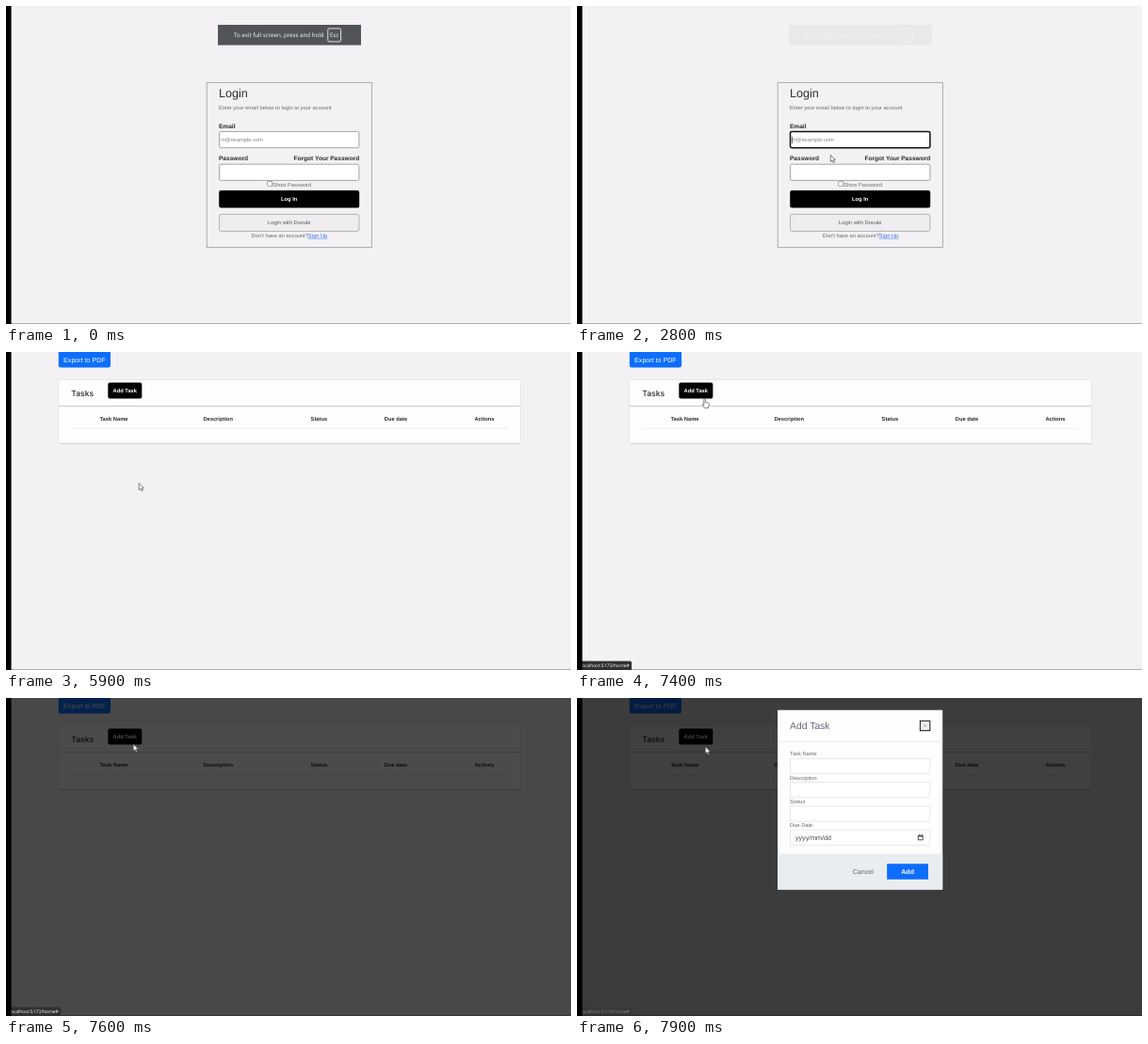
An HTML page that plays this animation: 600x338 px, repeating every 8000 ms.

```html
<!DOCTYPE html>
<html lang="en">
<head>
<meta charset="utf-8">
<title>Login and tasks</title>
<style>
  html, body { margin: 0; width: 100%; height: 100%; overflow: hidden; background: #f3f1f4; }
  svg { display: block; width: 600px; height: 338px; }
  text {
    font: 5.75px "Liberation Sans", Arial, sans-serif;
    fill: #6b6a6d; text-rendering: geometricPrecision; white-space: pre;
  }
  .ui { font-family: "Open Sans", "Noto Sans", sans-serif; fill: #fff; }
  .bold { font-weight: 700; fill: #29282a; }
  .label { font-size: 6.55px; }
  .mid { font-size: 7.1px; }
  .white { fill: #fff; }
  .middle { text-anchor: middle; }
  .field { fill: #fff; stroke: #929194; stroke-width: .8; }
  .field.focus { stroke: #101010; stroke-width: 1.5; }
  .line { fill: #fff; stroke: #dfe2e6; stroke-width: .8; }
  .blue { fill: #0d6efd; }
  .pointer { fill: #fff; stroke: #4c4c4e; stroke-width: .7; stroke-linejoin: round; }
</style>
</head>
<body>
<svg viewBox="0 0 600 338">
  <rect width="600" height="338" fill="#f3f1f4"/>

  <g id="login">
    <rect x="213.2" y="81.4" width="175.2" height="175.2" fill="none" stroke="#a5a4a7" stroke-width=".9"/>
    <text x="226" y="97.3" style="font-size:12.6px;fill:#2e2d2f">Login</text>
    <text x="226" y="110">Enter your email below to login to your account</text>

    <text class="bold label" x="226" y="130">Email</text>
    <rect id="email" class="field" x="226.5" y="133.5" width="148.4" height="17.2" rx="1.6"/>
    <text x="228" y="144.2" style="fill:#858487">m@example.com</text>
    <path id="caret" d="M228.4 138.8V146" stroke="#222" stroke-width=".7"/>

    <text class="bold label" x="226" y="164.3">Password</text>
    <text class="bold label" x="375.2" y="164.3" text-anchor="end">Forgot Your Password</text>
    <rect id="password" class="field" x="226.5" y="168.2" width="148.4" height="17.2" rx="1.6"/>

    <rect x="277.7" y="186.4" width="5" height="5" rx=".8" fill="#fff" stroke="#777" stroke-width=".7"/>
    <text x="283" y="191.6">Show Password</text>

    <rect x="226.2" y="196" width="149" height="18.6" rx="2"/>
    <text class="bold white middle" x="300.7" y="207.2">Log In</text>
    <rect x="226.5" y="221.4" width="148.4" height="18" rx="2" fill="#efedf0" stroke="#a3a2a5" stroke-width=".8"/>
    <text class="middle" x="300.7" y="232.3" style="fill:#58575a">Login with Dovule</text>

    <text x="260.6" y="245.8">Don't have an account?<tspan fill="#3b74ee" text-decoration="underline">Sign Up</tspan></text>
  </g>

  <g id="hint">
    <rect x="225" y="20" width="152" height="21.6" fill="#515459"/>
    <text class="ui" x="242" y="33" style="font-size:6.18px">To exit full screen, press and hold</text>
    <rect x="341.8" y="23.9" width="13.8" height="14" rx="1.4" fill="none" stroke="#f2f2f2" stroke-width=".9"/>
    <text class="ui middle" x="348.7" y="33" style="font-size:6.18px">Esc</text>
  </g>

  <g id="tasks">
    <rect class="blue" x="55.8" y="-3" width="55.2" height="19.6" rx="2.4"/>
    <text class="mid white middle" x="83.4" y="10.6">Export to PDF</text>

    <rect x="55.5" y="29.4" width="491" height="68.6" rx="1.5" fill="#e2e0e4"/>
    <rect x="56" y="30" width="490" height="67" rx="1" fill="#fffeff"/>
    <path d="M56 57.4H546" stroke="#c9c8cc"/>
    <path d="M56 97.3H546" stroke="#cfced2" stroke-width=".8"/>
    <text x="69.3" y="46.5" style="font:500 8.5px Inter,sans-serif;fill:#222">Tasks</text>
    <rect x="108.3" y="32.6" width="36" height="17" rx="2"/>
    <text class="bold white middle" x="126.3" y="43.2">Add Task</text>

    <g class="middle">
      <text class="bold" x="114.5" y="73">Task Name</text>
      <text class="bold" x="225.2" y="73">Description</text>
      <text class="bold" x="332.4" y="73">Status</text>
      <text class="bold" x="414" y="73">Due date</text>
      <text class="bold" x="508" y="73">Actions</text>
    </g>
    <path d="M69 81.3H533" stroke="#eae8ec" stroke-width=".8"/>
  </g>

  <path d="M5 337.5H600" stroke="#9b9a9d" stroke-width=".8"/>
  <rect id="shade" width="600" height="338"/>

  <g id="dialog">
    <rect x="213" y="12.8" width="175.2" height="190.8" fill="#fffeff"/>
    <rect x="213" y="165.6" width="175.2" height="38" fill="#e9edef"/>
    <path d="M213 46.2H388.2" stroke="#dfe2e6" stroke-width=".8"/>
    <text x="226" y="33" style="font-size:10.4px;fill:#626a78">Add Task</text>
    <rect x="364.4" y="24.3" width="10.4" height="10.4" fill="#efefef" stroke="#161616"/>
    <path d="M368.6 28.5l2 2m0-2l-2 2" stroke="#666" stroke-width=".6"/>

    <text x="226" y="61.3">Task Name</text>
    <rect class="line" x="226.4" y="64.4" width="148.4" height="16.2"/>
    <text x="226" y="86.8">Description</text>
    <rect class="line" x="226.4" y="89.6" width="148.4" height="16.2"/>
    <text x="226" y="112">Status</text>
    <rect class="line" x="226.4" y="114.9" width="148.4" height="16.2"/>
    <text x="226" y="137.3">Due Date</text>
    <rect class="line" x="226.4" y="140.1" width="148.4" height="16.2"/>
    <text class="mid" x="232" y="150.6" style="fill:#444a50">yyyy/mm/dd</text>
    <path d="M362.4 146.2h4.8v4.6h-4.8zM362.4 147h4.8M363.6 145v1M366 145v1" fill="none" stroke="#222" stroke-width=".8"/>

    <text class="mid middle" x="303.8" y="187" style="fill:#5c6167">Cancel</text>
    <rect class="blue" x="329.2" y="176.2" width="43.8" height="16.6"/>
    <text class="mid bold white middle" x="351.1" y="187">Add</text>
  </g>

  <g id="status">
    <path d="M0 328.4H56.6Q58 328.4 58 330V338H0Z" fill="#303032"/>
    <text class="ui" x="3.5" y="335.2" style="font-size:5px">localhost:5173/home#</text>
  </g>
  <rect width="5.6" height="338"/>

  <g id="cursor">
    <path id="arrow" class="pointer" d="M0 0V7.3L1.7 5.7 2.9 8.3 4.1 7.8 3 5.3H5.2Z"/>
    <path id="beam" d="M-1.8-4.5H1.8M0-4.5V4.5M-1.8 4.5H1.8" stroke="#333" stroke-width=".8"/>
    <path id="hand" class="pointer" d="M-.8.6Q0-.4.8.6V3.8L4 4.5Q4.9 4.8 4.7 6L4 9.8H-.2L-2.6 6.4Q-2.2 5.2-.8 6.4Z"/>
  </g>
</svg>

<script>
const LOOP = 8000, STEP = 100;
const CUT = 5900;
const $ = id => document.getElementById(id);

// Rows are [time, value, ...]; values run straight between rows.
const path = [
  [600, 123, 150], [800, 143, 156], [1000, 172, 167], [1300, 197.5, 174],
  [1800, 197.5, 174], [1900, 199, 173], [2300, 246, 149], [2400, 256, 144],
  [2600, 258, 143], [2800, 269.3, 158.3], [3000, 270.5, 171], [3400, 272, 175],
  [3600, 272, 175], [3800, 267, 175], [3900, 267, 175], [4000, 260, 174],
  [4300, 199, 158], [4600, 141.2, 139.5], [6500, 141.2, 139.5],
  [6800, 170, 119], [7000, 159, 82], [7200, 135.6, 49.6], [7500, 135.6, 49.6],
  [7600, 135.2, 49], [7900, 136.3, 51.8]
];
const hintFade = [[2200, 1], [2800, .05], [2900, 0]];
const shadeFade = [[7400, 0], [7600, .7], [7700, .75]];
const dialogFade = [[7600, 0], [7800, 1]];
const dialogSlide = [[7600, -14], [7700, -6], [7800, -1.5], [7900, 0]];
const statusFade = [[7600, 1], [7900, .4]];

function at(rows, t) {
  const next = rows.findIndex(r => r[0] > t);
  if (next === 0) return rows[0].slice(1);
  if (next < 0) return rows[rows.length - 1].slice(1);
  const a = rows[next - 1], b = rows[next];
  const k = (t - a[0]) / (b[0] - a[0]);
  return a.slice(1).map((v, i) => v + (b[i + 1] - v) * k);
}

const within = (t, from, to) => t >= from && t < to;
const show = (id, on) => { $(id).style.display = on ? "" : "none"; };
const fade = (id, value) => { $(id).style.opacity = value; };
const overField = (x, y) =>
  within(x, 226, 375) && (within(y, 133, 151) || within(y, 168, 186));

function draw(t) {
  const [x, y] = at(path, t);
  const inEmail = within(t, 2500, 3100);

  show("login", t < CUT);
  show("tasks", t >= CUT);
  $("email").classList.toggle("focus", inEmail);
  $("password").classList.toggle("focus", within(t, 3100, 4500));
  show("caret", inEmail);

  fade("hint", at(hintFade, t)[0]);
  fade("shade", at(shadeFade, t)[0]);
  fade("dialog", at(dialogFade, t)[0]);
  $("dialog").setAttribute("transform", `translate(0 ${at(dialogSlide, t)[0]})`);
  fade("status", t < 7400 ? 0 : at(statusFade, t)[0]);

  const beam = t < CUT && overField(x, y);
  const hand = within(t, 7200, 7600);
  show("cursor", t >= 600);
  show("beam", beam);
  show("hand", hand);
  show("arrow", !beam && !hand);
  $("cursor").setAttribute("transform", `translate(${x} ${y})`);
}

const start = performance.now();
function tick() {
  const t = (performance.now() - start) % LOOP;
  draw(Math.floor(t / STEP) * STEP);
  requestAnimationFrame(tick);
}
tick();
</script>
</body>
</html>
```
